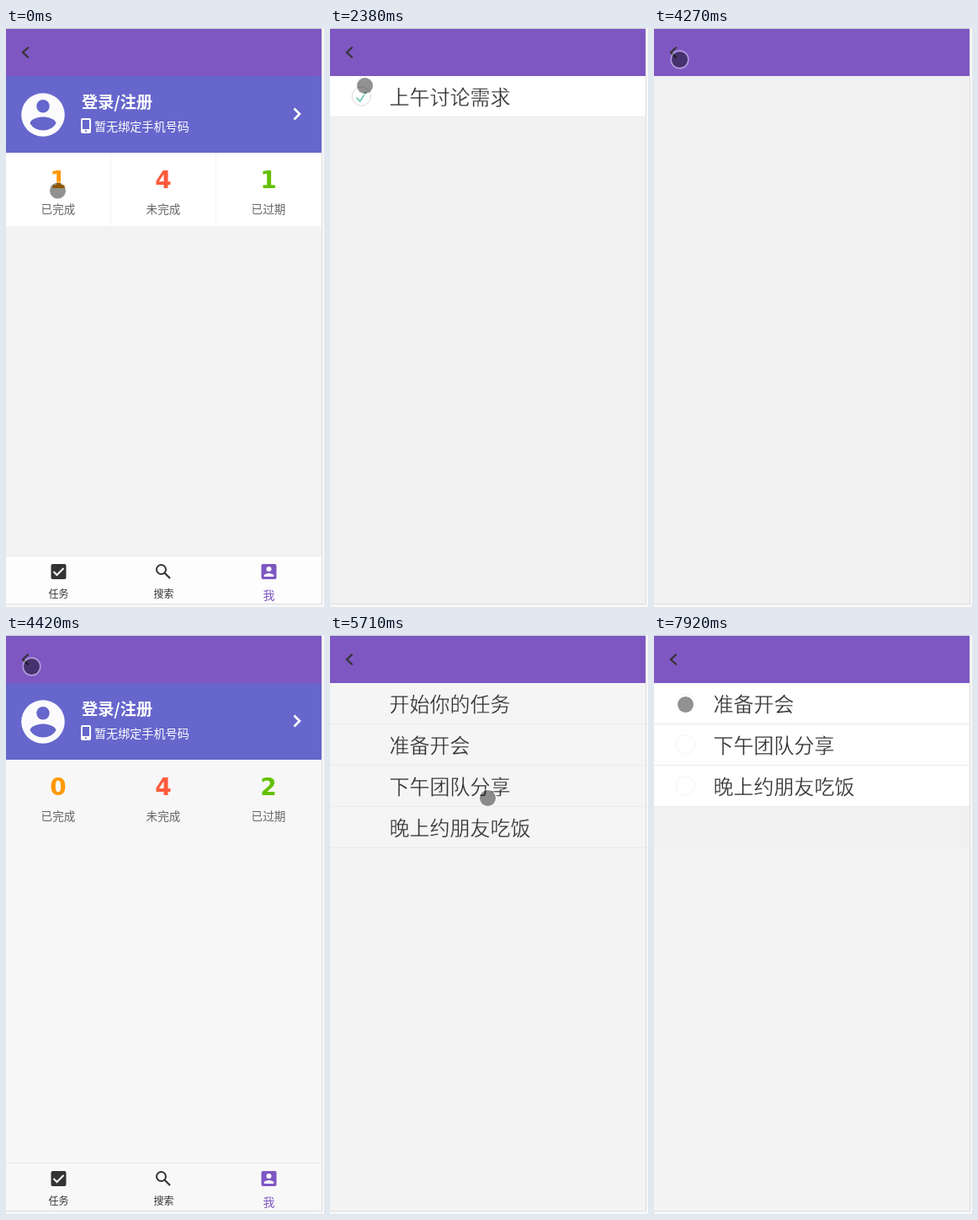
These frames come from a looping animation (378x687 px, 8000 ms). An HTML page:

```html
<!DOCTYPE html>
<html lang="zh-CN">
<head>
<meta charset="utf-8">
<title>任务</title>
<style>
  html, body { margin: 0; width: 100%; height: 100%; overflow: hidden; background: #f8f8f8; }
  svg { display: block; width: 378px; height: 687px; }
  text { font-family: "Noto Sans CJK SC", "Noto Sans CJK", sans-serif; }
  .item { font-size: 24px; font-weight: 300; fill: #333; stroke: #fff; stroke-width: .3px; }
  .count { font: bold 28px "DejaVu Sans", sans-serif; }
  .mid { text-anchor: middle; }
</style>
</head>
<body>
<svg viewBox="0 0 378 687">
  <g id="page"></g>
  <rect y="1" width="375" height="56" fill="#7e57c2"/>
  <path d="M26.7 22.7 20 29l6.7 6.3" fill="none" stroke="#333" stroke-width="2.2"/>
  <path d="M0 .5H375.5V683.5H0" fill="none" stroke="#dcdcdc"/>
  <g id="cursor">
    <circle r="10.3" fill="none" stroke="#fff" stroke-opacity=".4" stroke-width="1.7"/>
    <circle r="9.5" fill-opacity=".43"/>
  </g>
</svg>
<script>
const LOOP = 8000;
const FRAME = 130;
const ROW = 49;
const TOP = 57;
const COLUMN = 125;
const PURPLE = '#7e57c2';
const BLUE = '#6666cc';
const DARK = '#333';
const page = document.getElementById('page');
const cursor = document.getElementById('cursor');

const rect = (x, y, w, h, fill, rx = 0) =>
  `<rect x="${x}" y="${y}" width="${w}" height="${h}" rx="${rx}" fill="${fill}"/>`;
const circle = (x, y, r, fill, stroke = 'none', width = 1) =>
  `<circle cx="${x}" cy="${y}" r="${r}" fill="${fill}" stroke="${stroke}" stroke-width="${width}"/>`;
const line = (d, stroke, width) =>
  `<path d="${d}" fill="none" stroke="${stroke}" stroke-width="${width}"/>`;
const label = (text, x, y, size, fill, extra = 'class="mid"') =>
  `<text x="${x}" y="${y}" font-size="${size}" fill="${fill}" ${extra}>${text}</text>`;

const column = i => COLUMN * (i + .5);

// Head and shoulders around a centre point, in units of the given scale.
const bust = (x, y, scale, fill) => `<g transform="translate(${x} ${y}) scale(${scale})">`
  + circle(0, -4, 3, fill) + `<path fill="${fill}" d="M-6 4C-6 2-2 1 0 1S6 2 6 4Q4 7.2 0 7.2T-6 4z"/></g>`;

function tabs(fill) {
  const [task, search, me] = [0, 1, 2].map(column);
  return rect(0, 626, 375, 1, '#e8e8e8') + rect(0, 627, 375, 56, fill)
    + rect(task - 9, 636, 18, 18, DARK, 2) + line(`M${task - 6} 645l4 4 8-8`, '#fff', 2)
    + circle(search - 3, 642.5, 5.5, 'none', DARK, 2) + line(`M${search + 1} 646.5l6.5 6.5`, DARK, 2.2)
    + rect(me - 9, 636, 18, 18, PURPLE, 2) + bust(me, 646, 1, '#fff') + rect(me - 6, 651, 12, 3, PURPLE)
    + label('任务', task, 676.3, 12, DARK)
    + label('搜索', search, 676.3, 12, DARK)
    + label('我', me, 678, 14, PURPLE);
}

function profile(counts, bg, panel) {
  const colors = ['#ff9800', '#ff5a3c', '#64c005'];
  const names = ['已完成', '未完成', '已过期'];
  const stats = counts.map((n, i) =>
    `<text class="count mid" x="${column(i) - .5}" y="190" fill="${colors[i]}">${n}</text>`
    + label(names[i], column(i) - .5, 220, 13.6, '#666')
    + (i ? rect(COLUMN * i - 1, 148, 1, 87, bg) : '')).join('');
  return rect(0, 1, 375, 682, bg)
    + rect(0, TOP, 375, 91, BLUE)
    + circle(44, 103, 25.8, '#fbfbfd') + bust(44, 103, 2.58, BLUE)
    + label('登录/注册', 90, 94.5, 19.2, '#fff', 'font-weight="bold"')
    + rect(89, 107, 12, 18, '#fff', 2) + rect(91, 109, 8, 11, BLUE) + circle(95, 122.3, 1.1, BLUE)
    + label('暂无绑定手机号码', 105, 122.3, 14.1, '#fff', '')
    + line('M342.5 95.5l6.5 6.5-6.5 6.5', '#fff', 2.7)
    + rect(0, 148, 375, 87, panel) + stats
    + tabs(panel === bg ? '#f8f8f8' : '#fdfdfd');
}

function list(items, { bg = '#f1f1f1', row = '#fff', ring = '#fafafa', done = false } = {}) {
  return rect(0, 1, 375, 682, bg) + items.map((text, i) => {
    const y = TOP + ROW * i;
    return rect(0, y, 375, ROW, row) + rect(0, y + ROW - 1, 375, 1, '#eaeaea')
      + circle(37.3, y + 24, 11.2, 'none', ring)
      + (done ? line(`M31.5 ${y + 25.5}l4.2 4.5 7.2-11.3`, '#5dc2af', 1.5) : '')
      + `<text class="item" x="70.5" y="${y + 34}">${text}</text>`;
  }).join('');
}

const finished = ['上午讨论需求'];
const tasks = ['开始你的任务', '准备开会', '下午团队分享', '晚上约朋友吃饭'];
const pale = '#f4f4f4';
const screens = [
  [0, profile([1, 4, 1], '#f3f3f3', '#fff')],
  [500, list(finished, { ring: '#d8d8d8', done: true })],
  [3570, list(finished)],
  [3720, list([])],
  [4420, profile([0, 4, 2], '#f7f7f7', '#f7f7f7')],
  [5710, list(tasks, { bg: pale, row: '#f5f5f5', ring: pale })],
  [7450, list(tasks.slice(1), { bg: pale, ring: '#f3f3f3' }) + rect(0, TOP + 3 * ROW, 375, ROW, '#f1f1f1')]
];

// Pointer strokes: start time, number of steps, destination.
const home = { x: 61.5, y: 193 };
const strokes = [
  { start: 1860, steps: 4, x: 41.5, y: 68.5 },
  { start: 2380, steps: 2, x: 31.5, y: 42.5 },
  { start: 2640, steps: 4, x: 36.5, y: 85.5 },
  { start: 3870, steps: 3, x: 30.5, y: 37.5 },
  { start: 4730, steps: 4, x: 187.5, y: 193.5 },
  { start: 5860, steps: 6, x: 41.5, y: 83.5 },
  { start: 6790, steps: 1, x: 37.5, y: 82.5 }
];

const smooth = p => p * p * (3 - 2 * p);

function pointer(t) {
  let { x, y } = home;
  for (const stroke of strokes) {
    if (t < stroke.start) break;
    const step = Math.floor((t - stroke.start) / FRAME);
    const p = smooth(Math.min(1, step / stroke.steps));
    x += (stroke.x - x) * p;
    y += (stroke.y - y) * p;
  }
  return `translate(${x} ${y})`;
}

let shown;
function draw(t) {
  const screen = screens.findLast(([start]) => start <= t);
  if (screen !== shown) page.innerHTML = (shown = screen)[1];
  cursor.setAttribute('transform', pointer(t));
}

const start = performance.now();
function tick() {
  draw((performance.now() - start) % LOOP);
  requestAnimationFrame(tick);
}
tick();
</script>
</body>
</html>
```
